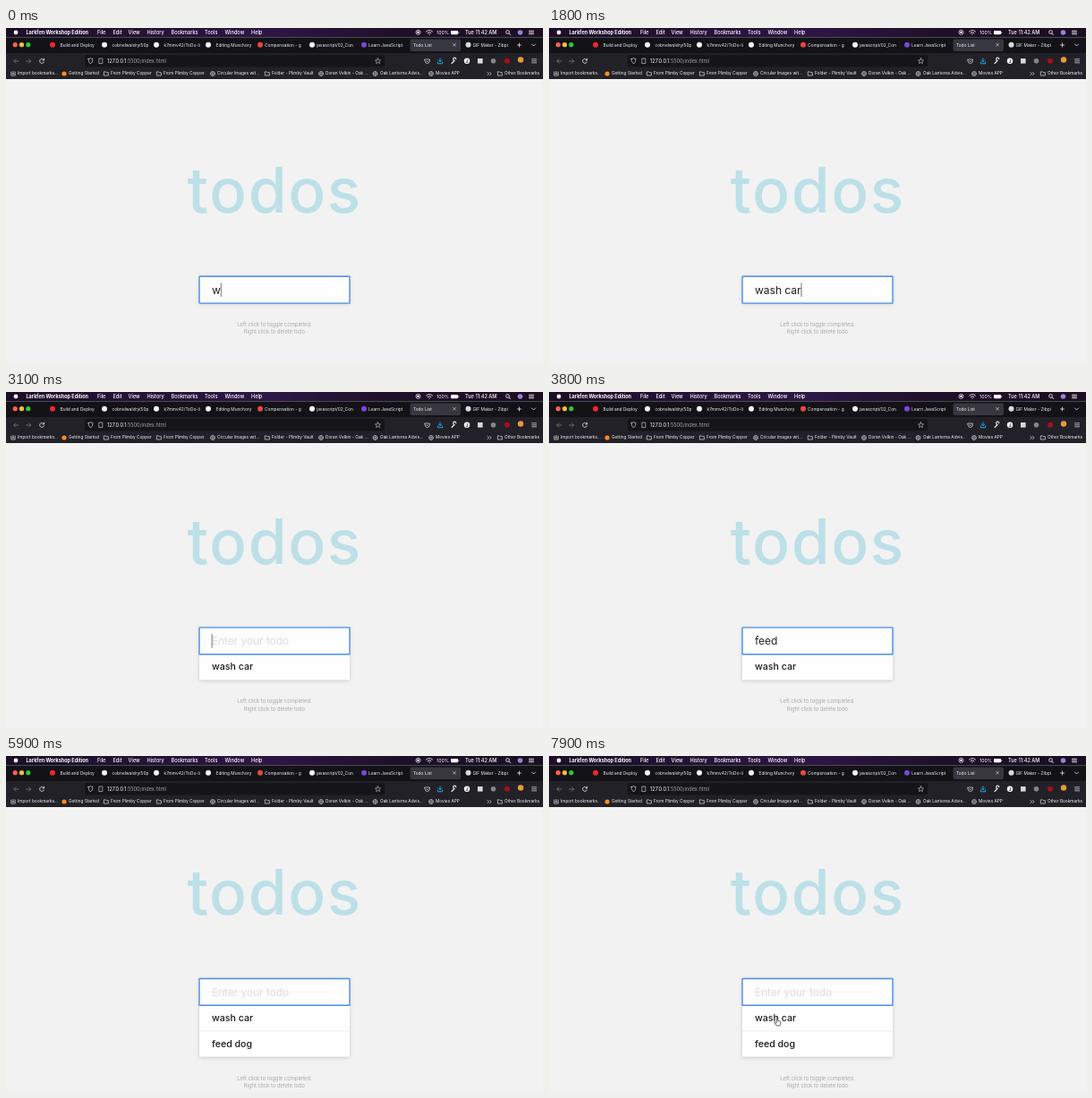
Recreate the animation shown at these times as an HTML page. Size 600 by 375 pixels, loop 8 s.

```html
<!DOCTYPE html>
<html lang="en">
<head>
<meta charset="utf-8">
<title>Todo List</title>
<style>
  html, body { margin: 0; width: 100%; height: 100%; overflow: hidden; background: #f2f2f2; }
  svg { display: block; width: 100%; height: 100%; }
  text { font-family: Inter, "Open Sans", sans-serif; white-space: pre; }
  .shadow { filter: drop-shadow(0 1.5px 2px rgba(0, 0, 0, .16)); }
</style>
</head>
<body>
<svg id="stage" viewBox="0 0 600 375">
  <defs>
    <linearGradient id="menuFill">
      <stop offset="0" stop-color="#1b0e26"/>
      <stop offset=".5" stop-color="#2d1645"/>
      <stop offset=".72" stop-color="#1f1029"/>
      <stop offset="1" stop-color="#1c0e22"/>
    </linearGradient>
  </defs>
  <rect width="600" height="375" fill="#f2f2f2"/>
  <g id="chrome"></g>
  <g id="page"></g>
  <g id="pointer" stroke-linejoin="round"></g>
</svg>
<script>
const LOOP = 8000, STEP = 100, BLINK = 500, ROW = 28.7, SHIFT = 14.4;
const SVG = 'http://www.w3.org/2000/svg';
const byId = id => document.getElementById(id);

function add(parent, tag, attrs, content) {
  const node = document.createElementNS(SVG, tag);
  for (const key in attrs) node.setAttribute(key, attrs[key]);
  if (content !== undefined) node.textContent = content;
  parent.appendChild(node);
  return node;
}
const rect = (p, x, y, width, height, fill, more) => add(p, 'rect', { x, y, width, height, fill, ...more });
const dot = (p, cx, cy, r, fill, more) => add(p, 'circle', { cx, cy, r, fill, ...more });
const label = (p, x, y, size, fill, str, more) => add(p, 'text', { x, y, 'font-size': size, fill, ...more }, str);
const line = (p, d, stroke = '#e4e4ea', width = .8) =>
  add(p, 'path', { d, stroke, 'stroke-width': width, fill: 'none', 'stroke-linecap': 'round' });

function drawMenuBar(g) {
  rect(g, 0, 0, 600, 10.5, 'url(#menuFill)');
  dot(g, 11, 5, 2.4, '#f2f0f4');
  label(g, 22.5, 6.9, 5.5, '#fff', 'Larkfen Workshop Edition', { 'font-weight': 700 });
  const menus = { File: 102, Edit: 119.5, View: 136.5, History: 157.5, Bookmarks: 184.5, Tools: 222, Window: 244.5, Help: 274 };
  for (const name in menus) label(g, menus[name], 6.9, 5.6, '#fff', name, { 'font-weight': 500 });
  dot(g, 460.5, 4.8, 2.5, 'none', { stroke: '#fff', 'stroke-width': .7 });
  dot(g, 460.5, 4.8, 1.2, '#fff');
  line(g, 'M469.5 4q3.5 -3 7 0M471 5.6q2 -1.7 4 0M472.8 7.2h.4', '#fff');
  label(g, 481, 6.8, 5.3, '#fff', '100%');
  rect(g, 497, 3, 8, 4.2, '#fff', { rx: 1 });
  rect(g, 505.4, 4.2, .7, 1.8, '#fff');
  label(g, 513, 6.9, 5.6, '#fff', 'Tue 11:42 AM', { 'font-weight': 500 });
  dot(g, 560.5, 4.5, 1.9, 'none', { stroke: '#fff', 'stroke-width': .8 });
  line(g, 'M562 6l1.6 1.7', '#fff');
  dot(g, 574.5, 5, 2.8, '#8f86d8');
  line(g, 'M584.5 3.2h5M584.5 5h5M584.5 6.8h5', '#fff');
}

function drawTabs(g) {
  rect(g, 0, 10.5, 600, 17.5, '#131217');
  ['#ff5f57', '#febc2e', '#28c840'].forEach((fill, i) => dot(g, 10.2 + i * 7.3, 18.7, 2.6, fill));
  rect(g, 451.5, 12.5, 56.5, 13.5, '#38373f', { rx: 2 });
  const tabs = [
    [52, 60.5, '#f0262c', 'Build and Deploy'],
    [110, 118.5, '#f4f4f6', 'cobnelwaldry/50p'],
    [168, 176.5, '#f4f4f6', 'k7mmv42/ToDo-li'],
    [226, 234.5, '#f4f4f6', 'Editing Munchory'],
    [284, 289, '#e5493d', 'Compensation - g'],
    [342, 347, '#f4f4f6', 'javascript/02_Con'],
    [400, 405, '#7b45d8', 'Learn JavaScript'],
    [0, 455, '', 'Todo List'],
    [516.5, 521.5, '#d9d9dd', 'GIF Maker - Zibpi']
  ];
  for (const [cx, x, fill, name] of tabs) {
    if (fill) dot(g, cx, 18.8, 3, fill);
    label(g, x, 20.5, 4.8, '#f0f0f4', name);
  }
  line(g, 'M499.6 17.4l2.8 2.8m0 -2.8l-2.8 2.8', '#e8e8ec', .6);
  line(g, 'M573.5 17v4m-2 -2h4');
  line(g, 'M587.5 18l2 2l2 -2');
}

function drawToolbar(g) {
  rect(g, 0, 28, 600, 29, '#222127');
  line(g, 'M14 37h-5.2m2.2 -2.2l-2.2 2.2l2.2 2.2', '#77767f');
  line(g, 'M22.5 37h5.2m-2.2 -2.2l2.2 2.2l-2.2 2.2', '#77767f');
  line(g, 'M42.3 35.6a2.5 2.5 0 1 0 .2 2.2M42.6 34.2v1.8h-1.8');
  rect(g, 88, 30, 335, 13.5, '#151419', { rx: 2 });
  line(g, 'M92 34.5l2.5 -.8l2.5 .8q0 4 -2.5 5.5q-2.5 -1.5 -2.5 -5.5z', '#d4d4da', .7);
  line(g, 'M104.2 34h3.6v5.6h-3.6z', '#c8c8ce', .7);
  const url = label(g, 113, 38.7, 5.6, '#a4a3ab', '');
  add(url, 'tspan', { fill: '#fbfbfe' }, '127.0.0.1');
  add(url, 'tspan', {}, ':5500/index.html');
  line(g, 'M415.5 33.8l.9 2l2.1 .2l-1.6 1.5l.5 2.1l-1.9 -1.1l-1.9 1.1l.5 -2.1l-1.6 -1.5l2.1 -.2z', '#d4d4da', .6);
  line(g, 'M468 35h5.4v1.8q-.4 2.6 -2.7 2.8q-2.3 -.2 -2.7 -2.8zM469.5 36.6l1.2 1.2l1.2 -1.2', '#e4e4ea', .7);
  line(g, 'M485 33.8v3.7m-1.8 -1.6l1.8 1.8l1.8 -1.8M482.4 38v1.8h5.2v-1.8', '#1fb4f5', .9);
  line(g, 'M498 39.5l3 -3M501 36.3a1.6 1.6 0 1 1 1.8 -1.4', '#eee', 1.1);
  dot(g, 515, 36.8, 3.2, '#f7f7f8');
  label(g, 515, 38.6, 4.6, '#222', 'J', { 'text-anchor': 'middle', 'font-weight': 700 });
  rect(g, 527, 34, 5.6, 5.6, '#d8d8de');
  dot(g, 544.5, 36.8, 2.8, '#85848d');
  dot(g, 560, 36.8, 3, '#a3101c');
  dot(g, 575, 35.5, 3.2, '#e79a3c');
  line(g, 'M587.6 34.8h5M587.6 36.8h5M587.6 38.8h5', '#e4e4ea', .7);
}

function drawBookmarks(g) {
  const folder = x => line(g, `M${x - 2.3} 48.9h1.8l.7 .8h2.2v3.3h-4.7z`, '#dedee4', .7);
  const globe = x => {
    dot(g, x, 51, 2.4, 'none', { stroke: '#dedee4', 'stroke-width': .7 });
    line(g, `M${x - 2.3} 51h4.6M${x} 48.7v4.6`, '#dedee4', .5);
  };
  line(g, 'M5.8 49v4h4.4v-4M8 48.4v3m-1.2 -1.1l1.2 1.2l1.2 -1.2', '#dedee4', .7);
  dot(g, 65, 51, 2.6, '#ff8a24');
  [112, 171, 292, 552].forEach(folder);
  [231, 352, 412.5, 475].forEach(globe);
  const names = [
    [13, 'Import bookmarks...'], [70, 'Getting Started'],
    [117, 'From Plimby Copper'], [176, 'From Plimby Copper'],
    [236, 'Circular Images wit...'], [297, 'Folder - Plimby Vault'],
    [357, 'Doran Velkin - Oak ...'], [418, 'Oak Lanterna Advis...'],
    [480, 'Movies APP'], [557, 'Other Bookmarks']
  ];
  for (const [x, name] of names) label(g, x, 52.3, 4.75, '#f4f4f8', name);
  line(g, 'M538 49.4l1.6 1.6l-1.6 1.6m2.6 -3.2l1.6 1.6l-1.6 1.6', '#e4e4ea', .7);
}

[drawMenuBar, drawTabs, drawToolbar, drawBookmarks].forEach(draw => draw(byId('chrome')));

const page = byId('page');
const title = label(page, 202.5, 206, 69.5, '#bde0e8', 'todos', { 'font-weight': 500, 'letter-spacing': 1.6 });
const card = add(page, 'g', { class: 'shadow' });
const panel = rect(card, 216, 277, 168, 30, '#fefefe');
const rows = ['wash car', 'feed dog'].map((task, i) => {
  const y = 30 + i * ROW, g = add(page, 'g', {});
  if (i) rect(g, 216, y - .3, 168, .6, '#e2e2e2');
  label(g, 230, y + 17.8, 10.6, '#1a1a1a', task, { 'font-weight': 500 });
  return g;
});
const field = add(page, 'g', {});
rect(field, 216, .3, 168, 29.8, '#fefefe', { stroke: '#4a8fe8', 'stroke-width': 1.4, rx: .5 });
const hint = label(field, 230, 19.5, 11.85, '#dcdcdc', 'Enter your todo');
const typed = label(field, 230, 19.8, 12, '#222', '');
const caret = rect(field, 230, 7.5, .8, 15.5, '#555');
const help = add(page, 'g', { 'text-anchor': 'middle' });
label(help, 300, 332.8, 5.85, '#a9a9a9', 'Left click to toggle completed.');
label(help, 300, 341.3, 5.85, '#a9a9a9', 'Right click to delete todo');

const pointer = byId('pointer');
const arrow = add(pointer, 'path', {
  d: 'M0 0V7.8L1.9 6.1L3.1 8.8L4.3 8.3L3.1 5.7H5.6Z', fill: '#111', stroke: '#fff', 'stroke-width': .6
});
const hand = add(pointer, 'path', {
  d: 'M-.8 -3.4q.8 -1 1.5 0v3q2.6 .1 3 1.2v2.6l-.8 1.6h-3.6l-2.6 -3.4q.2 -1.3 1.5 -.2l1 .8z',
  fill: '#fff', stroke: '#222', 'stroke-width': .7
});

// [time, text in the field, finished todos]
const keys = [
  [0, 'w', 0], [200, 'wa', 0], [400, 'was', 0], [600, 'wash', 0], [800, 'wash ', 0],
  [1100, 'wash c', 0], [1300, 'wash ca', 0], [1500, 'wash car', 0], [2100, '', 1],
  [3200, 'fe', 1], [3300, 'feed', 1], [4000, 'feed ', 1], [4100, 'feed d', 1],
  [4300, 'feed do', 1], [4500, 'feed dog', 1], [5300, '', 2]
];

function movePointer(t) {
  pointer.style.display = t < 7300 ? 'none' : '';
  const p = Math.min(1, Math.max(0, (t - 7300) / 500)), ease = 1 - (1 - p) ** 2;
  const x = 479 + (255 - 479) * ease, y = 325 + (296 - 325) * ease;
  const over = x < 384;
  arrow.style.display = over ? 'none' : '';
  hand.style.display = over ? '' : 'none';
  pointer.setAttribute('transform', `translate(${x} ${y})`);
}

function render(t) {
  const [since, str, count] = keys.filter(key => key[0] <= t).pop();
  const up = count * SHIFT, top = 277 - up;
  title.setAttribute('y', 206 - up);
  field.setAttribute('transform', `translate(0 ${top})`);
  help.setAttribute('transform', `translate(0 ${up})`);
  panel.setAttribute('y', top);
  panel.setAttribute('height', 30 + count * ROW);
  rows.forEach((row, i) => {
    row.setAttribute('transform', `translate(0 ${top})`);
    row.style.display = i < count ? '' : 'none';
  });
  typed.textContent = str;
  hint.style.display = str ? 'none' : '';
  caret.setAttribute('x', 230 + (str ? typed.getComputedTextLength() : -.3));
  caret.style.display = (t - since) % (2 * BLINK) < BLINK ? '' : 'none';
  movePointer(t);
}

const start = performance.now();
function tick() {
  const t = (performance.now() - start) % LOOP;
  render(Math.floor(t / STEP) * STEP);
  requestAnimationFrame(tick);
}
tick();
</script>
</body>
</html>
```
